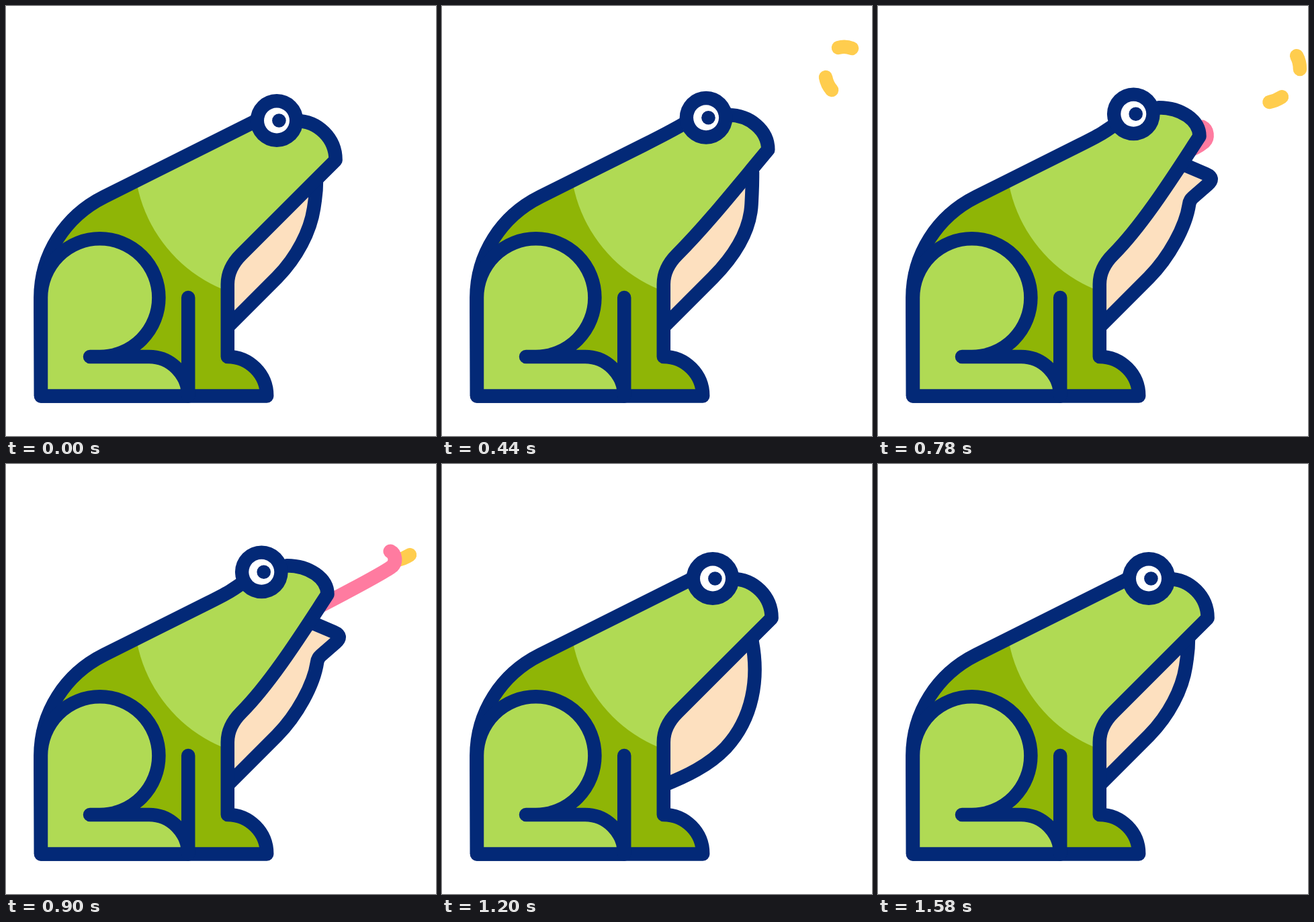
Write an HTML page that moves like this. It is 640x640 px and loops after 1600 ms.

```html
<!DOCTYPE html>
<html lang="en">
<head>
<meta charset="utf-8">
<title>Frog</title>
<style>
  html, body { margin: 0; width: 100%; height: 100%; overflow: hidden; background: #fff; }
  svg { display: block; width: 100vw; height: 100vh; }
  .line { fill: none; stroke: #032977; stroke-width: 20.5; stroke-linecap: round; stroke-linejoin: round; }
  .trail { fill: none; stroke: #ffcd4e; stroke-linecap: round; }
  #tongue { fill: none; stroke: #ff7ba0; stroke-width: 21; stroke-linecap: round; }
</style>
</head>
<body>
<svg viewBox="0 0 640 640">
  <defs><clipPath id="inside"><path class="body"/></clipPath></defs>
  <path class="trail" pathLength="1" d="M580 125Q573 117 571 106"/>
  <path class="trail" pathLength="1" d="M590 62Q600 59 610 63"/>
  <path class="trail" pathLength="1" d="M623 74Q628 83 628 94"/>
  <path class="trail" pathLength="1" d="M601 135.3Q592 141 582.5 143"/>
  <path id="throatFill" fill="#fde0bf"/>
  <path id="throat" class="line"/>
  <path id="tongue"/>
  <path class="body" fill="#8fb506"/>
  <circle cx="404.5" cy="224.5" r="213.5" fill="#b0da54" clip-path="url(#inside)"/>
  <path class="body line"/>
  <path class="line" style="fill:#b0da54" d="M52 580.4V434A87.7 87.7 0 0 1 227.4 434A87.7 87.7 0 0 1 139.7 522H125H213A58.4 58.4 0 0 1 271.2 580.4Z"/>
  <path class="line" d="M271.2 434V580.4"/>
  <g id="eye">
    <circle r="39.4" fill="#032977"/>
    <circle r="19" fill="#fff"/>
    <circle cx="3.4" r="10.3" fill="#032977"/>
  </g>
</svg>
<script>
const LOOP = 1600;
const $ = id => document.getElementById(id);
const bodies = document.querySelectorAll('.body');
const trail = document.querySelectorAll('.trail');

const clamp = u => Math.min(1, Math.max(0, u));
const mix = (a, b, u) => a + (b - a) * u;
// Eased 0 to 1 between two times
const ramp = (t, from, to) => {
  const u = clamp((t - from) / (to - from));
  return u * u * (3 - 2 * u);
};

// Point at distance d from a towards b
function toward([ax, ay], [bx, by], d) {
  const u = d / Math.hypot(bx - ax, by - ay);
  return [mix(ax, bx, u), mix(ay, by, u)];
}
// Rounded corner at p between a and b
const corner = (a, p, b, r) => `L${toward(p, a, r)}Q${p} ${toward(p, b, r)}`;

function bodyPath(lift) {
  const snout = [mix(432, 418, lift), mix(171, 151.2, lift)];
  const tip = [mix(490.6, 478.5, lift), mix(229.4, 194, lift)];
  return `M51.4 455V434C51.4 370 88 313 146 284L300 207` +
    `C325 194.5 ${356 - 14 * lift} ${179 + 7 * lift} ${385 - 25 * lift} ${164.5 + 5.5 * lift}` +
    `L${snout}A${tip[0] - snout[0]} ${tip[1] - snout[1]} 0 0 1 ${tip}` +
    `C445 ${275 - 30 * lift} 396 324 350 370` +
    `C337 383 329.8 397 329.8 414V522A58.4 58.4 0 0 1 388.2 580.4H52Z`;
}

// Lower jaw: the lip swings out from a hinge under the mouth
function jawPath(lift, open) {
  const hinge = [462 - 7 * open * open, 256 - 20 * lift];
  const angle = mix(90, 23, open) * Math.PI / 180, length = mix(18, 51, open);
  const lip = [hinge[0] + length * Math.cos(angle), hinge[1] + length * Math.sin(angle)];
  const notch = [459 + 3 * lift + 2 * open, 295 + 12 * lift - 18 * open * open];
  const low = [notch[0] - 6, notch[1] + 40];
  const end = toward(notch, low, 6);
  return `M${hinge}${corner(hinge, lip, notch, 15)}${corner(lip, notch, low, 6)}` +
    `L${end}C${low} 433 374 403.5 404L329.8 477.7`;
}

// Throat pouch, from slack (0) to full (1)
function pouchPath(puff) {
  const p = (x0, y0, x1, y1) => [mix(x0, x1, puff), mix(y0, y1, puff)];
  return `M461.5 264C${p(461.5, 316, 492, 325)} ${p(440.6, 367, 505, 400)} ${p(403.5, 404, 459, 456)}` +
    `C${p(379, 428.5, 432, 487)} ${p(354, 453, 380, 488)} ${p(329.8, 477.7, 329.8, 479)}`;
}

function draw(t) {
  const shut = ramp(t, 940, 1095);
  const lift = .65 * ramp(t, 0, 260) - .25 * ramp(t, 260, 500) + .6 * ramp(t, 500, 780) - shut;
  const open = ramp(t, 620, 780) - shut;
  const puff = ramp(t, 1110, 1340) - ramp(t, 1380, 1570);
  const reach = ramp(t, 730, 875) - ramp(t, 930, 1098);

  bodies.forEach(b => b.setAttribute('d', bodyPath(lift)));
  $('eye').setAttribute('transform', `translate(${403 - 22.7 * lift} ${170.5 - 9.7 * lift})`);

  const throat = puff > 0 ? pouchPath(puff) : jawPath(lift, open);
  $('throat').setAttribute('d', throat);
  $('throatFill').setAttribute('d', throat + 'L320 300Z');

  const x = mix(450, 575, reach), y = mix(222, 152, reach);
  $('tongue').setAttribute('d', `M455 218Q${x - 12} ${y + 10} ${x} ${y}` +
    `C${x + 6} ${y - 6} ${x + 5} ${y - 18} ${x - 3} ${y - 22}`);

  // Each dash is drawn on, then wiped off in the same direction
  trail.forEach((dash, i) => {
    const end = clamp((t - 100 - 175 * i) / 70);
    const start = clamp((t - 490 - 145 * i) / 70);
    dash.style.display = end > start ? '' : 'none';
    dash.style.strokeDasharray = `${end - start} 2`;
    dash.style.strokeDashoffset = -start;
    dash.style.strokeWidth = 20.5 * Math.min(1, 2 * (end - start));
  });
}

const began = performance.now();
function tick() {
  draw((performance.now() - began) % LOOP);
  requestAnimationFrame(tick);
}
tick();
</script>
</body>
</html>
```
